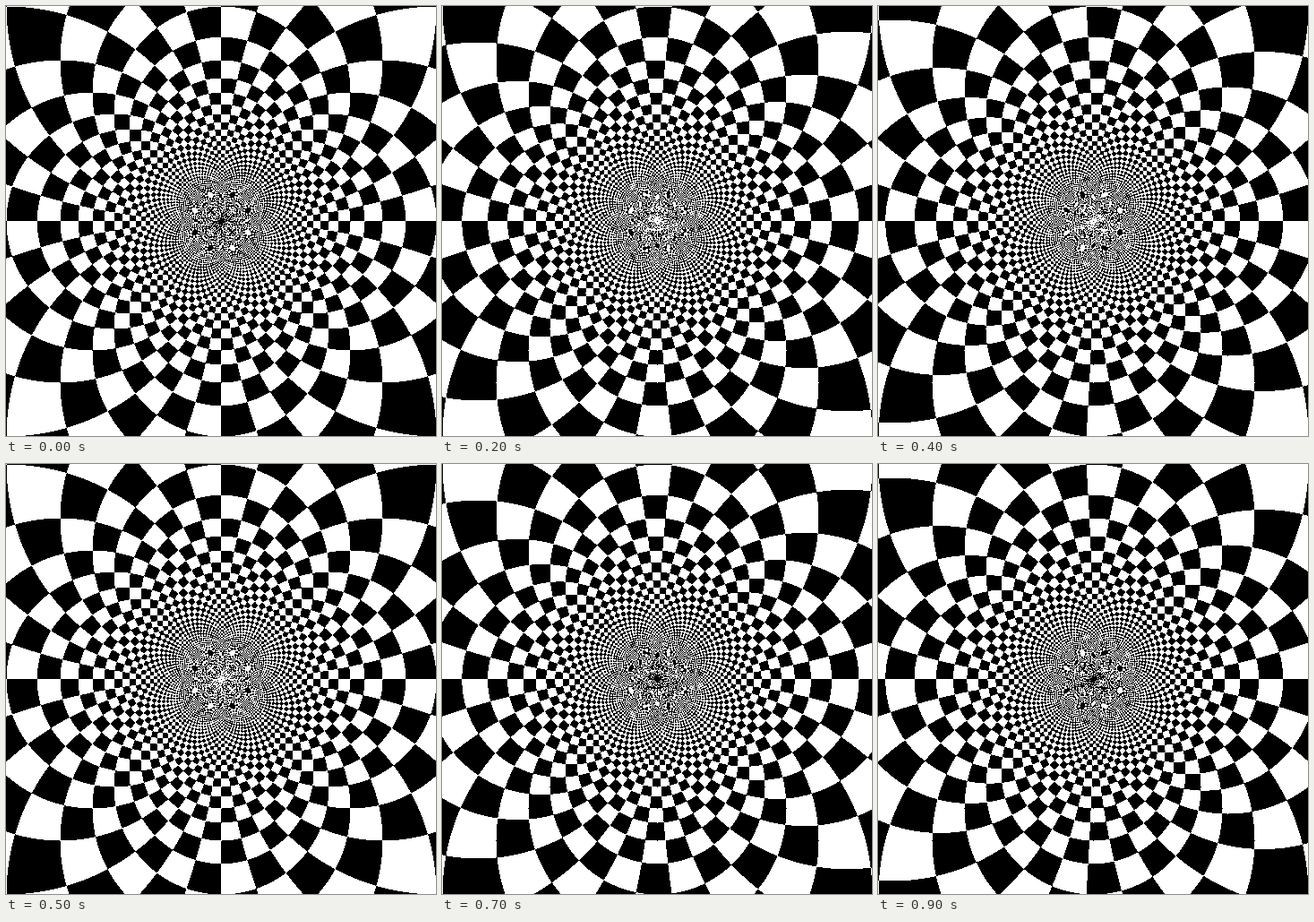
Write an HTML page with a canvas that moves like this. It is 480x480 px and loops after 1 s.

```html
<!DOCTYPE html>
<html lang="en">
<head>
<meta charset="utf-8">
<title>Inverted checkerboard</title>
<style>
  html, body { margin: 0; width: 100%; height: 100%; overflow: hidden; background: #fff; }
  canvas { display: block; width: 480px; height: 480px; }
</style>
</head>
<body>
<canvas id="stage" width="480" height="480"></canvas>
<script>
const SIZE = 480, HALF = SIZE / 2;
const SCALE = 3 * SIZE;   // checker cells per unit of 1/z
const STEPS = 10, STEP_MS = 100;

const ctx = document.getElementById('stage').getContext('2d');
const image = ctx.createImageData(SIZE, SIZE);
const pixels = new Uint32Array(image.data.buffer);
const BLACK = 0xff000000, WHITE = 0xffffffff;

// A checkerboard seen through the inversion 1/z, sliding along its u axis.
function draw(shift) {
  let i = 0;
  for (let y = -HALF; y < HALF; y++) {
    for (let x = -HALF; x < HALF; x++) {
      const k = SCALE / (x * x + y * y);
      const cell = Math.floor(x * k - shift) + Math.floor(y * k);
      pixels[i++] = cell & 1 ? WHITE : BLACK;
    }
  }
  ctx.putImageData(image, 0, 0);
}

const start = performance.now();
let shown = -1;

function tick(now) {
  const step = Math.floor(Math.max(0, now - start) / STEP_MS) % STEPS;
  if (step !== shown) {
    shown = step;
    draw(2 * step / STEPS);   // two cells per loop
  }
  requestAnimationFrame(tick);
}
tick(start);
</script>
</body>
</html>
```
